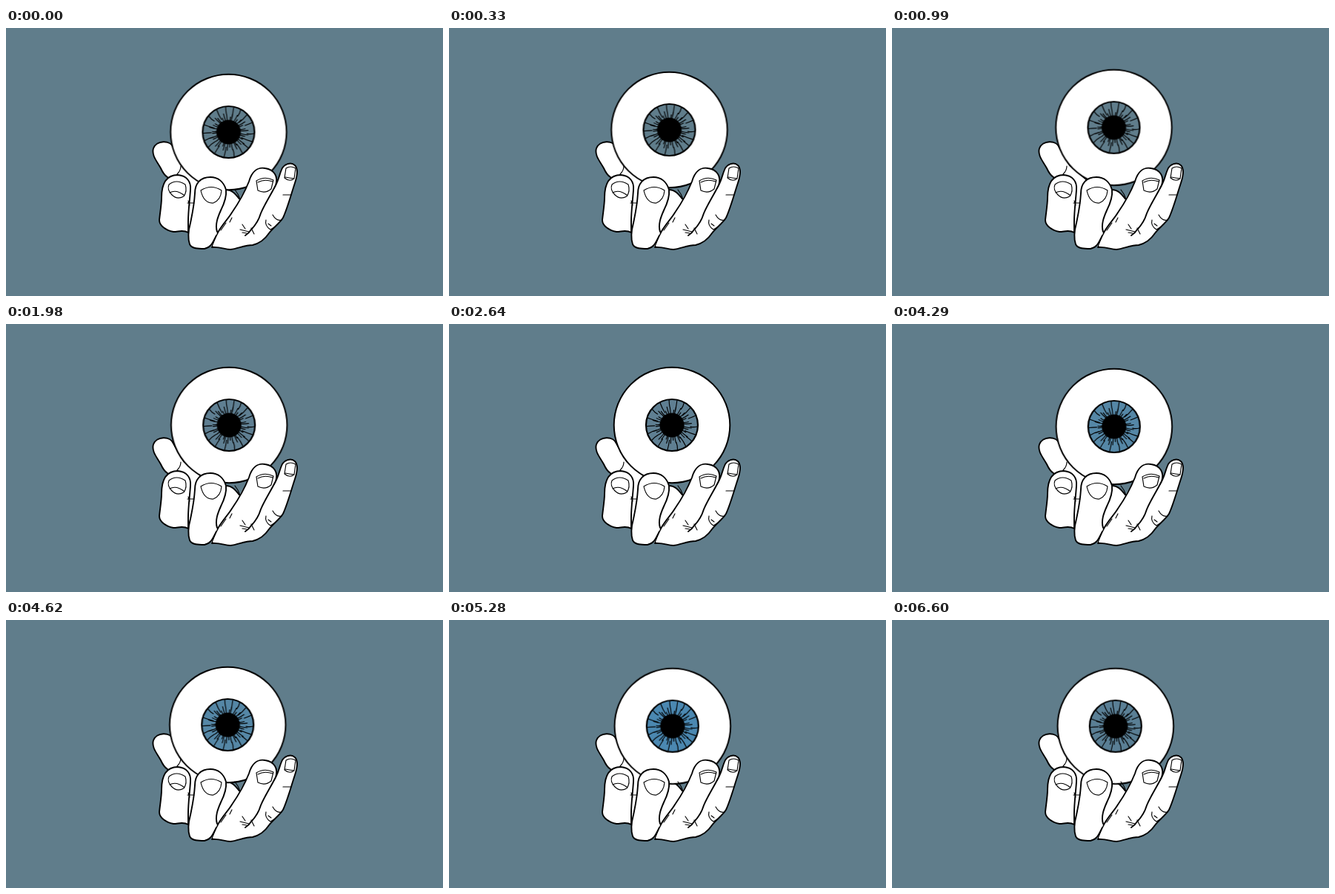
Recreate the animation shown at these times as an HTML page. Size 590 px wide and 363 px high, loop 6.93 s.

```html
<!DOCTYPE html>
<html lang="en">
<head>
<meta charset="utf-8">
<title>Eye in hand</title>
<style>
  html, body { margin: 0; width: 100%; height: 100%; overflow: hidden; background: #607d8b; }
  svg { display: block; width: 590px; height: 363px; }
  .skin { fill: #fff; stroke: #000; stroke-width: 1.9; stroke-linejoin: round; stroke-linecap: round; }
  .line { fill: none; stroke: #000; stroke-width: 1.15; stroke-linecap: round; stroke-linejoin: round; }
  .fill { fill: #fff; }
  #eye { animation: hover 6930ms step-end infinite; }
  #iris { fill: #607d8b; animation: tint 6930ms step-end infinite; }

  /* 21 equal poses, 330 ms each */
  @keyframes hover {
    0%     { transform: translate(300.5px, 141px); }
    4.76%  { transform: translate(297.5px, 138px); }
    9.52%  { transform: translate(297.5px, 136px); }
    14.28% { transform: translate(299.5px, 134.8px); }
    19.04% { transform: translate(301.5px, 136.5px); }
    23.80% { transform: translate(301.5px, 137px); }
    28.57% { transform: translate(301.2px, 137px); }
    33.33% { transform: translate(300.5px, 136.5px); }
    38.09% { transform: translate(301px, 137px); }
    42.85% { transform: translate(305px, 134px); }
    47.61% { transform: translate(299.8px, 137px); }
    52.38%, 61.90% { transform: translate(299.8px, 139px); }
    66.66% { transform: translate(299.3px, 142px); }
    71.42%, 100% { transform: translate(301.8px, 143.8px); }
  }
  @keyframes tint {
    0%     { fill: #607d8b; }
    28.57% { fill: #5f7f92; }
    47.61% { fill: #5d8197; }
    57.14% { fill: #59859f; }
    61.90% { fill: #5587a6; }
    71.42% { fill: #4f87ac; }
    76.19% { fill: #4b88b1; }
    80.95% { fill: #5086aa; }
    85.71% { fill: #5682a0; }
    95.23%, 100% { fill: #5a7f95; }
  }
</style>
</head>
<body>
<svg viewBox="0 0 590 363">
  <g id="palm">
    <path class="skin" d="M240 186L226 162C222 151 203 152 199 163C196 173 205 182 209 190Q213 199 218 202L235 260L300 280L317 234C310 225 306 219 296 219L262 205Z"/>
    <path class="line" d="M236 187Q236 193 231 198"/>
  </g>

  <g id="eye">
    <circle r="78.3" fill="#fff" stroke="#000" stroke-width="2"/>
    <circle id="iris" r="35" stroke="#000" stroke-width="2.2"/>
    <path id="rays" class="line"/>
    <circle r="16.6"/>
  </g>

  <g id="hand">
    <path class="fill" d="M244 228L255 228L256 277L244 276ZM290 255L317 234L340 225L364 212L360 270L330 294L304 299L277 296Z"/>
    <path class="skin" d="M364 213C368 206 369 199 372 192C375 184 385 181 390 186C395 191 393 201 390 210C385 225 380 244 374 257C370 264 360 271 355 278C349 287 341 292 333 294C322 294 313 299 303 300C295 300 290 296 278 297L284 280L325 279Z"/>
    <path class="fill" d="M284 283L302 255L326 213L364 210L350 247L361 270L330 290L303 297L279 295Z"/>
    <path class="skin" d="M284 281C290 268 299 260 305 250C314 237 322 223 328 208C332 194 340 188 350 190C362 192 368 201 364 213C357 227 349 239 344 251C341 261 337 267 331 273Q328 278 323 281"/>
    <path class="skin" d="M246 277C239 273 233 276 226 276C216 274 207 268 207 260C208 250 210 239 210 230C210 213 215 199 232 199C244 200 250 208 249 219C248 235 246 247 246 262Z"/>
    <path class="skin" d="M285 276C282 266 286 256 290 247C295 237 298 227 297 219C294 208 286 202 276 202C262 202 255 211 255 224C254 241 251 254 249 264C246 275 245 284 248 293C251 299 260 299 268 299C277 297 279 291 284 281"/>

    <path class="line" d="M220 212Q230 204 242 212Q245 221 240 228Q231 233 224 226Q217 219 220 212M221 223Q230 218 241 227"/>
    <path class="line" d="M263 220Q277 211 291 220Q290 233 280 237Q267 238 263 220"/>
    <path class="line" d="M338 207Q349 200 361 206L358 218Q350 225 340 220L338 207M340 209Q349 204 360 208"/>
    <path class="line" d="M378 190Q384 186 391 190L389 204Q383 209 376 203ZM377 202Q382 203 389 204"/>
    <path class="line" d="M245 237H254M246 234L248 240M374 226H384M360 253Q365 262 372 260M351 260Q349 268 357 273L362 270M354 265L358 268M316 273L328 276M319 277L325 278M319 266L323 272M305 257L302 263M297 264L290 274M309 219Q314 225 316 232M331 271L335 279"/>
  </g>
</svg>
<script>
  const wobble = (i, k) => Math.sin(i * k + 1.7);
  const polar = (r, a) => `${(r * Math.cos(a)).toFixed(2)} ${(r * Math.sin(a)).toFixed(2)}`;
  const ray = (from, to, angle, bend) =>
    `M${polar(from, angle)}Q${polar((from + to) / 2, angle + bend)} ${polar(to, angle + bend / 2)}`;

  let path = '';
  for (let i = 0; i < 18; i++) {
    const angle = i * Math.PI / 9 + 0.06 * wobble(i, 5.3);
    path += ray(34, 22 + 3 * wobble(i, 2.9), angle, 0.05 * wobble(i, 7.1));
  }
  for (let i = 0; i < 36; i++) {
    const angle = (i + 0.5) * Math.PI / 18 + 0.04 * wobble(i, 3.7);
    path += ray(16, 23.5 + 3 * wobble(i, 4.3), angle, 0.05 * wobble(i, 6.1));
  }
  document.getElementById('rays').setAttribute('d', path);
</script>
</body>
</html>
```
